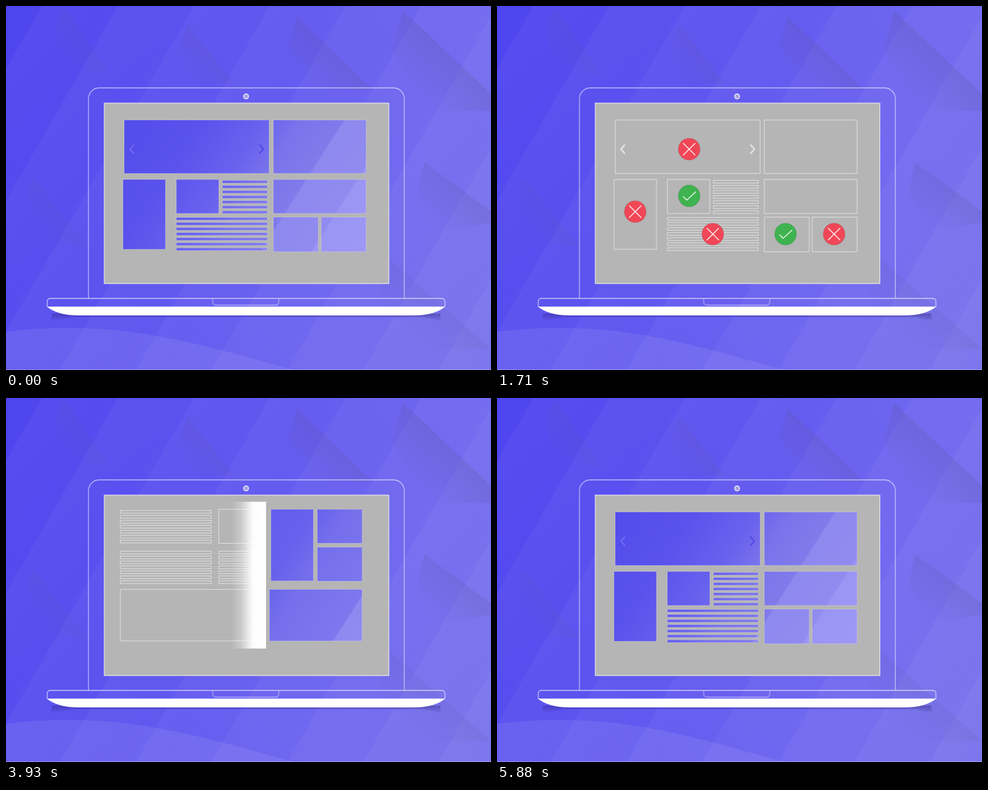
Write an HTML page with a canvas that moves like this. It is 800 by 600 pixels and loops after 6.45 s.

```html
<!DOCTYPE html>
<html lang="en">
<head>
<meta charset="utf-8">
<title>Page layout scan</title>
<style>
html, body { margin: 0; width: 100%; height: 100%; overflow: hidden; background: #5f57ee; }
canvas { display: block; }
</style>
</head>
<body>
<canvas id="stage" width="800" height="600"></canvas>
<script>
const LOOP = 6450, STEP = 30, GREY = '#b5b5b5';
const stage = document.getElementById('stage').getContext('2d');

function layer() {
  const c = document.createElement('canvas');
  c.width = 800;
  c.height = 600;
  return c.getContext('2d');
}
const backdrop = layer(), screen = layer(), buffer = layer();

const clamp = v => Math.max(0, Math.min(1, v));
const ramp = (t, start, length) => clamp((t - start) / length);
const white = a => `rgba(255,255,255,${a})`;

function trace(g, points) {
  g.beginPath();
  points.forEach(([x, y], i) => i ? g.lineTo(x, y) : g.moveTo(x, y));
}

// Seven thin bars standing for a paragraph.
const bars = (x, y, w, pitch) =>
  Array.from({ length: 7 }, (_, i) => [x, y + i * pitch, w, 4.5]);

function sheen(stops) {
  const g = screen.createLinearGradient(0, 0, 0.843 * 800, 0.539 * 800);
  stops.forEach(([s, color]) => g.addColorStop(s / 800, `rgb(${color})`));
  return g;
}

const first = {
  boxes: [
    [195, 188, 239, 88], [441, 188, 153, 88], [193, 286, 70, 115],
    [281, 286, 70, 56], [441, 286, 153, 56], [441, 348, 74, 57], [520, 348, 74, 57],
    ...bars(357, 287.5, 74, 8.35), ...bars(281, 348.5, 150, 8.35)
  ],
  arrows: true,
  fill: sheen([[266, '83,76,236'], [375, '90,82,236'], [462, '105,98,238'],
    [512, '122,116,235'], [570, '128,122,235'], [572, '142,137,238'],
    [641, '145,139,240'], [643, '155,149,243'], [720, '158,152,245']]),
  icons: [
    [476, 376, true, 810], [317, 313, true, 930], [317, 236, false, 1050],
    [228, 339, false, 1170], [356, 376, false, 1290], [556, 376, false, 1410]
  ]
};

const second = {
  boxes: [
    [351, 183.5, 74, 56], [437, 183.5, 70, 118], [513.5, 183.5, 74, 56],
    [513.5, 246, 74, 56], [188.5, 315.5, 240, 85], [434.5, 315.5, 153, 85],
    ...bars(188.5, 185.5, 150, 8.15), ...bars(188.5, 252.5, 150, 8.15),
    ...bars(351, 252.5, 74, 8.15)
  ],
  fill: sheen([[266, '84,77,238'], [446, '97,90,237'], [530, '104,97,238'],
    [577, '117,111,236'], [669, '125,120,238'], [671, '142,137,240'], [720, '146,141,241']]),
  icons: [
    [387, 211, true, 4350], [262, 211, false, 4380], [473, 244, true, 4500],
    [554, 211, true, 4620], [308, 360, false, 4770]
  ]
};

function arrow(g, x, dir, color, width) {
  trace(g, [[x - 3.5 * dir, 228.5], [x + 3 * dir, 236], [x - 3.5 * dir, 243.5]]);
  g.strokeStyle = color;
  g.lineWidth = width;
  g.stroke();
}

function icon(g, [x, y, ok, start], t) {
  const a = ramp(t, start, 300);
  if (!a) return;
  g.save();
  g.globalAlpha *= a;
  g.translate(x, y);
  g.fillStyle = ok ? '#3eb34f' : '#f04757';
  g.beginPath();
  g.arc(0, 0, 18, 0, 7);
  g.fill();
  g.strokeStyle = 'rgba(90,90,90,.15)';
  g.lineWidth = 1.5;
  g.stroke();
  g.strokeStyle = white(0.9);
  g.lineWidth = 1.6;
  if (ok) {
    trace(g, [[-10, 1], [-4, 7], [11, -7]]);
    g.stroke();
  } else {
    trace(g, [[-10, -10], [10, 10]]);
    g.stroke();
    trace(g, [[10, -10], [-10, 10]]);
    g.stroke();
  }
  g.restore();
}

// Left of edge the page is an outline; right of it the boxes are open.
function page(g, p, t, edge, dy = 0) {
  g.save();
  g.translate(0, dy);
  for (const scanned of [true, false]) {
    g.save();
    g.beginPath();
    g.rect(scanned ? 0 : edge, -600, scanned ? edge : 800, 1800);
    g.clip();
    g.lineWidth = 1;
    g.fillStyle = p.fill;
    g.strokeStyle = white(scanned ? 0.6 : 0.22);
    for (const [x, y, w, h] of p.boxes) {
      if (!scanned) g.fillRect(x, y, w, h);
      g.strokeRect(x, y, w, h);
    }
    if (p.arrows) {
      arrow(g, 207.5, -1, scanned ? white(0.55) : 'rgb(120,114,242)', scanned ? 3 : 1.8);
      arrow(g, 421.5, 1, scanned ? white(0.55) : 'rgb(80,70,232)', scanned ? 3 : 2.2);
    }
    g.restore();
  }
  p.icons.forEach(i => icon(g, i, t));
  g.restore();
}

function blank(g) {
  g.fillStyle = GREY;
  g.fillRect(162, 160, 470, 298);
}

function beam(g, x, bottom, alpha) {
  if (alpha <= 0) return;
  const grad = g.createLinearGradient(x - 58, 0, x, 0);
  grad.addColorStop(0, white(0));
  grad.addColorStop(0.3, white(0.3));
  grad.addColorStop(0.62, white(0.97));
  grad.addColorStop(1, white(1));
  g.globalAlpha = alpha;
  g.fillStyle = grad;
  g.fillRect(x - 58, 171, 58, bottom - 171);
  g.globalAlpha = 1;
}

function scroll(t) {
  return 263 * (1 - Math.cos(Math.PI * ramp(t, 2250, 530))) / 2;
}

// Averages several moments of the scroll for motion blur.
function scrolling(t) {
  const samples = 12;
  for (let k = 0; k < samples; k++) {
    const y = scroll(t + (k / (samples - 1) - 0.5) * 17);
    buffer.clearRect(0, 0, 800, 600);
    blank(buffer);
    buffer.save();
    buffer.beginPath();
    buffer.rect(162, 178, 470, 257);
    buffer.clip();
    page(buffer, first, t, 800, -y);
    page(buffer, second, t, 0, 263 - y);
    buffer.restore();
    screen.globalAlpha = 1 / (k + 1);
    screen.drawImage(buffer.canvas, 0, 0);
  }
  screen.globalAlpha = 1;
}

function draw(t) {
  screen.clearRect(0, 0, 800, 600);
  blank(screen);
  if (t < 2280) {
    const x = 192 + 414 * ramp(t, 30, 1110);
    page(screen, first, t, t < 30 ? 0 : t > 1140 ? 800 : x);
    beam(screen, x, 417, Math.min(ramp(t, 0, 90), 1 - ramp(t, 1080, 170)));
  } else if (t < 2790) {
    scrolling(t);
  } else {
    const x = 151 + 444 * ramp(t, 3210, 1150);
    page(screen, second, t, t < 3210 ? 0 : t > 4360 ? 800 : x);
    beam(screen, x, 413, Math.min(ramp(t, 3195, 170), 1 - ramp(t, 4300, 180)));
    const mix = ramp(t, 5310, 570);
    if (mix) {
      buffer.clearRect(0, 0, 800, 600);
      blank(buffer);
      page(buffer, first, 0, 0);
      screen.globalAlpha = mix;
      screen.drawImage(buffer.canvas, 0, 0);
      screen.globalAlpha = 1;
    }
  }
  stage.drawImage(backdrop.canvas, 0, 0);
  stage.drawImage(screen.canvas, 0, 0);
  stage.strokeStyle = white(0.65);
  stage.lineWidth = 1.4;
  stage.strokeRect(162, 160, 469.5, 297.5);
}

// A fold: dark along its upper edge, fading towards the lower left.
function fold(g, x, y, dx, dy, depth, a) {
  const len = Math.hypot(dx, dy), nx = -dy / len * depth, ny = dx / len * depth;
  const grad = g.createLinearGradient(x, y, x + nx, y + ny);
  grad.addColorStop(0, `rgba(95,85,165,${a})`);
  grad.addColorStop(1, 'rgba(95,85,165,0)');
  g.fillStyle = grad;
  trace(g, [[x, y], [x + dx, y + dy], [x + dx * 0.6 + nx, y + dy * 0.6 + ny], [x + nx * 0.3, y + ny]]);
  g.fill();
}

function scenery(g) {
  let grad = g.createLinearGradient(0, 100, 800, 420);
  grad.addColorStop(0, 'rgb(80,70,239)');
  grad.addColorStop(0.5, 'rgb(99,91,239)');
  grad.addColorStop(0.8, 'rgb(115,108,240)');
  grad.addColorStop(1, 'rgb(122,117,236)');
  g.fillStyle = grad;
  g.fillRect(0, 0, 800, 600);

  // Slanted bands of light.
  for (let i = 0; i < 9; i++) {
    const x = 60 + i * 125;
    grad = g.createLinearGradient(x, 0, x + 80, 46);
    grad.addColorStop(0, white(0.035));
    grad.addColorStop(1, white(0));
    g.fillStyle = grad;
    trace(g, [[x, 0], [x + 110, 0], [x - 236, 600], [x - 346, 600]]);
    g.fill();
  }
  fold(g, 655, 8, 175, 165, 90, 0.26);
  fold(g, 480, 18, 125, 120, 70, 0.22);
  fold(g, 300, 30, 75, 98, 55, 0.16);
  fold(g, 95, 0, 75, 112, 60, 0.12);
  fold(g, 690, 258, 130, 95, 70, 0.22);
  fold(g, 45, 283, 90, 115, 50, 0.12);
  fold(g, 630, 415, 170, 150, 80, 0.13);

  g.fillStyle = white(0.08);
  g.beginPath();
  g.moveTo(0, 537);
  g.quadraticCurveTo(60, 529, 130, 531);
  g.bezierCurveTo(260, 535, 380, 575, 475, 600);
  g.lineTo(0, 600);
  g.fill();
  g.fillStyle = white(0.4);
  g.fillRect(0, 599.2, 800, 0.8);
}

function laptop(g) {
  const shade = g.createLinearGradient(0, 508, 0, 520);
  shade.addColorStop(0, 'rgba(45,38,130,.4)');
  shade.addColorStop(1, 'rgba(45,38,130,0)');
  g.fillStyle = shade;
  trace(g, [[76, 507], [716, 507], [718, 519], [690, 513], [110, 513], [74, 519]]);
  g.fill();

  g.strokeStyle = white(0.6);
  g.lineWidth = 1.3;
  g.beginPath();
  g.moveTo(136, 482);
  g.arcTo(136, 135, 154, 135, 18);
  g.arcTo(657, 135, 657, 153, 18);
  g.lineTo(657, 482);
  g.stroke();

  g.beginPath();
  g.arc(396, 149, 4, 0, 7);
  g.fillStyle = 'rgb(165,160,225)';
  g.fill();
  g.strokeStyle = white(0.85);
  g.lineWidth = 1.6;
  g.stroke();

  g.strokeStyle = white(0.65);
  g.lineWidth = 1.3;
  g.beginPath();
  g.moveTo(68, 496);
  g.arcTo(68, 482, 74, 482, 5);
  g.arcTo(724, 482, 724, 488, 5);
  g.lineTo(724, 496);
  g.stroke();

  g.strokeStyle = white(0.45);
  g.beginPath();
  g.moveTo(341, 482);
  g.arcTo(341, 493, 347, 493, 5);
  g.arcTo(450, 493, 450, 487, 5);
  g.lineTo(450, 482);
  g.stroke();

  g.fillStyle = '#fff';
  g.beginPath();
  g.moveTo(67.5, 495.5);
  g.lineTo(724.5, 495.5);
  g.bezierCurveTo(715, 504, 697, 510, 672, 510);
  g.lineTo(120, 510);
  g.bezierCurveTo(95, 510, 77, 504, 67.5, 495.5);
  g.fill();
}

scenery(backdrop);
laptop(backdrop);

let origin;
function tick(now) {
  if (origin === undefined) origin = now;
  const t = Math.max(0, now - origin) % LOOP;
  draw(Math.floor(t / STEP) * STEP);
  requestAnimationFrame(tick);
}
draw(0);
requestAnimationFrame(tick);
</script>
</body>
</html>
```
